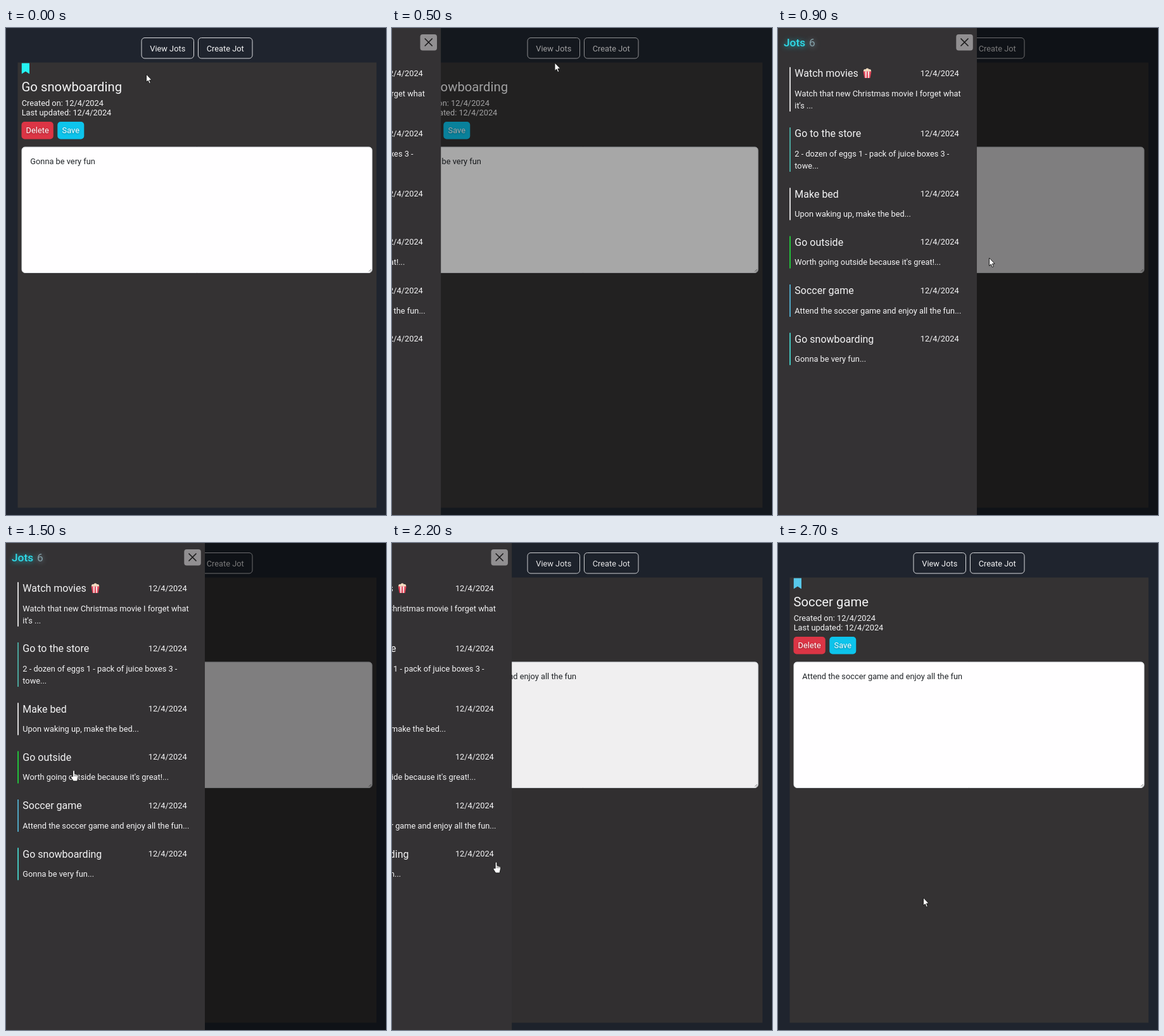
These frames come from a looping animation (600 by 769 pixels, 3700 ms). An HTML page with a canvas:

```html
<!DOCTYPE html>
<html lang="en">
<head>
<meta charset="utf-8">
<title>Jots</title>
<style>
  html, body { margin: 0; width: 100%; height: 100%; overflow: hidden; background: #1f242e; }
  canvas { display: block; width: 600px; height: 769px; }
</style>
</head>
<body>
<canvas id="stage"></canvas>
<script>
const W = 600, H = 769, LOOP = 3700, TICK = 100;
const OPEN = 397, CLOSE = 2068, SLIDE = 300, FADE = 150, PANEL = 314;
const FONT = 'Roboto, "Open Sans", sans-serif';

const canvas = document.getElementById('stage');
const c = canvas.getContext('2d');
const dpr = window.devicePixelRatio || 1;
canvas.width = W * dpr;
canvas.height = H * dpr;

const DATE = '12/4/2024';
const snow = { title: 'Go snowboarding', body: 'Gonna be very fun', mark: '#25f4f2' };
const soccer = { title: 'Soccer game', body: 'Attend the soccer game and enjoy all the fun', mark: '#58c8ea' };

const items = [
  { y: 61.8, h: 70, color: '#f4f4f4', title: 'Watch movies', lines: ['Watch that new Christmas movie I forget what', "it's ..."] },
  { y: 157, h: 70, color: '#4fb9ae', title: 'Go to the store', lines: ['2 - dozen of eggs 1 - pack of juice boxes 3 -', 'towe...'] },
  { y: 252.4, h: 51, color: '#f4f4f4', title: 'Make bed', lines: ['Upon waking up, make the bed...'] },
  { y: 328.6, h: 51, color: '#20d83c', title: 'Go outside', lines: ["Worth going outside because it's great!..."] },
  { y: 405, h: 51, color: '#55b9da', title: soccer.title, lines: [soccer.body + '...'] },
  { y: 481.3, h: 51, color: '#48dcd4', title: snow.title, lines: [snow.body + '...'] }
];

// Pointer path: time, x, y
const path = [
  [0, 221, 73], [100, 228, 56], [200, 244, 30], [400, 247, 28], [500, 256.5, 55],
  [700, 298, 230], [900, 333, 363], [1000, 450, 385], [1100, 536, 390], [1200, 456, 385],
  [1300, 300, 376], [1400, 170, 366], [1500, 107, 358.5], [1600, 106, 395],
  [1700, 105, 430], [2100, 105, 430], [2200, 164.5, 503.5], [2300, 205, 540], [2400, 229, 560]
];

const clamp = v => Math.max(0, Math.min(1, v));

// cubic-bezier(.42, 0, .58, 1)
function easeInOut(x) {
  let lo = 0, hi = 1;
  for (let i = 0; i < 20; i++) {
    const s = (lo + hi) / 2, r = 1 - s;
    if (1.26 * r * r * s + 1.74 * r * s * s + s * s * s < x) lo = s; else hi = s;
  }
  return lo * lo * (3 - 2 * lo);
}

function pointerAt(t) {
  let i = path.findIndex(p => p[0] > t);
  if (i < 0) return path[path.length - 1].slice(1);
  const [t0, x0, y0] = path[i - 1], [t1, x1, y1] = path[i];
  const k = (t - t0) / (t1 - t0);
  return [x0 + (x1 - x0) * k, y0 + (y1 - y0) * k];
}

function text(str, x, y, size = 12.8, color = '#f4f4f5', align = 'left', weight = 400) {
  c.font = `${weight} ${size}px ${FONT}`;
  c.textAlign = align;
  c.fillStyle = color;
  c.fillText(str, x, y);
}

function box(x, y, w, h, r, fill, stroke) {
  c.beginPath();
  c.roundRect(x, y, w, h, r);
  if (fill) { c.fillStyle = fill; c.fill(); }
  if (stroke) { c.strokeStyle = stroke; c.lineWidth = 1; c.stroke(); }
}

function poly(points, fill, stroke) {
  c.beginPath();
  points.forEach(([x, y]) => c.lineTo(x, y));
  c.closePath();
  if (fill) { c.fillStyle = fill; c.fill(); }
  if (stroke) { c.strokeStyle = stroke; c.lineWidth = 1; c.stroke(); }
}

function shadow(color, blur, y = 0) {
  c.shadowColor = color;
  c.shadowBlur = blur * dpr;
  c.shadowOffsetY = y * dpr;
}

function outlineButton(x, w, label) {
  box(x + .5, 15.5, w - 1, 32.5, 5, null, '#d9dadd');
  text(label, x + w / 2, 37, 12.8, '#f4f4f5', 'center');
}

function solidButton(x, w, label, fill) {
  box(x, 148, w, 27.5, 5, fill);
  c.save();
  shadow('rgba(0,0,0,.35)', 3, 1);
  text(label, x + w / 2, 166, 12.8, '#fff', 'center');
  c.restore();
}

function drawPage(jot) {
  c.fillStyle = '#1f242e';
  c.fillRect(0, 0, W, H);
  outlineButton(213.5, 83.5, 'View Jots');
  outlineButton(303, 86.5, 'Create Jot');

  c.fillStyle = '#343233';
  c.fillRect(18.5, 54.5, 566.5, 703);
  poly([[24.8, 55.5], [37, 55.5], [37, 72.5], [30.9, 68.6], [24.8, 72.5]], jot.mark);
  text(jot.title, 24.5, 99.5, 20.3);
  text('Created on: ' + DATE, 24.7, 123);
  text('Last updated: ' + DATE, 24.7, 138.3);
  solidButton(24.5, 50.3, 'Delete', '#dc3545');
  solidButton(81.3, 42, 'Save', '#0dc4ec');

  box(25, 188, 553, 198.5, 5, '#fffeff', '#dee2e6');
  text(jot.body, 38.3, 215.2, 12.8, '#212529');
  c.strokeStyle = '#777';
  c.beginPath();
  c.moveTo(573, 384.5); c.lineTo(576.5, 381);
  c.moveTo(575.5, 384.5); c.lineTo(576.5, 383.5);
  c.stroke();
}

function drawPopcorn(x, y) {
  c.fillStyle = '#f3dcc0';
  [[3.5, 4], [7, 2.5], [10.5, 4], [7, 5]].forEach(([dx, dy]) => {
    c.beginPath();
    c.arc(x + dx, y + dy, 2.5, 0, 7);
    c.fill();
  });
  poly([[x + .5, y + 5], [x + 13.5, y + 5], [x + 11.5, y + 15.5], [x + 2.5, y + 15.5]], '#e0475a');
  [4, 8.2].forEach(dx => poly([[x + dx - .4, y + 5], [x + dx + 2, y + 5], [x + dx + 1.5, y + 15.5], [x + dx, y + 15.5]], '#f6e4e4'));
}

function drawPanel(edge) {
  c.save();
  c.translate(edge - PANEL, 0);
  c.fillStyle = '#343234';
  c.fillRect(0, 0, PANEL, H);

  c.save();
  shadow('rgba(30,225,240,.75)', 8, 1);
  text('Jots', 9, 28.5, 17.3, '#2fdcea', 'left', 500);
  shadow('rgba(150,190,205,.7)', 8, 1);
  text('6', 49, 28.5, 17.3, '#84a0a8');
  c.restore();

  box(281.3, 10, 26.5, 25.5, 4, '#918f91');
  c.strokeStyle = '#1c1b1c';
  c.lineWidth = 1.7;
  c.lineCap = 'round';
  c.beginPath();
  c.moveTo(289, 17); c.lineTo(300, 28);
  c.moveTo(300, 17); c.lineTo(289, 28);
  c.stroke();

  for (const it of items) {
    c.fillStyle = it.color;
    c.fillRect(18.2, it.y, 1.7, it.h);
    text(it.title, 26.3, it.y + 15.3, 16);
    text(DATE, 285.6, it.y + 13.8, 12.8, '#f4f4f5', 'right');
    it.lines.forEach((line, i) => text(line, 26.3, it.y + 45.8 + i * 19.2));
  }
  drawPopcorn(134, 63.5);
  c.restore();
}

function drawArrow(x, y) {
  c.save();
  c.translate(x, y);
  poly([[.5, 0], [.5, 12.6], [3.3, 10], [5.2, 14.6], [7.3, 13.7], [5.4, 9.3], [9.2, 9.1]], '#fff', '#1a1a1a');
  c.restore();
}

function drawHand(x, y) {
  c.save();
  c.translate(x, y);
  c.beginPath();
  c.moveTo(-1.4, 10);
  c.lineTo(-1.4, 1.4);
  c.quadraticCurveTo(0, -.8, 1.4, 1.4);
  c.lineTo(1.4, 6);
  c.lineTo(5.4, 7);
  c.quadraticCurveTo(7.4, 7.5, 7.2, 10);
  c.lineTo(5.6, 17.5);
  c.lineTo(-.8, 17.5);
  c.lineTo(-4.6, 11.6);
  c.quadraticCurveTo(-4, 8.6, -1.4, 10.5);
  c.closePath();
  c.fillStyle = '#fff';
  c.fill();
  c.strokeStyle = '#1a1a1a';
  c.lineWidth = 1;
  c.stroke();
  c.beginPath();
  [1.4, 3.3, 5.2].forEach(dx => { c.moveTo(dx, 7); c.lineTo(dx, 10); });
  c.lineWidth = .6;
  c.stroke();
  c.restore();
}

function drawPointer(t) {
  if (t >= 2000 && t < 2100) return;
  const [x, y] = pointerAt(t);
  const hand = (t >= 200 && t < 500) || (t >= 1300 && t < 2300);
  (hand ? drawHand : drawArrow)(x, y);
}

function draw(t) {
  c.setTransform(dpr, 0, 0, dpr, 0, 0);
  drawPage(t < CLOSE ? snow : soccer);

  const dim = clamp((t - OPEN) / FADE) - clamp((t - CLOSE) / FADE);
  c.fillStyle = `rgba(0,0,0,${dim * .5})`;
  c.fillRect(0, 0, W, H);

  const shown = easeInOut(clamp((t - OPEN) / SLIDE)) - easeInOut(clamp((t - CLOSE) / SLIDE));
  if (shown > .001) drawPanel(PANEL * shown);
  drawPointer(t);
}

const start = performance.now();
function frame() {
  const t = (performance.now() - start) % LOOP;
  draw(Math.floor(t / TICK) * TICK);
  requestAnimationFrame(frame);
}
frame();
</script>
</body>
</html>
```
